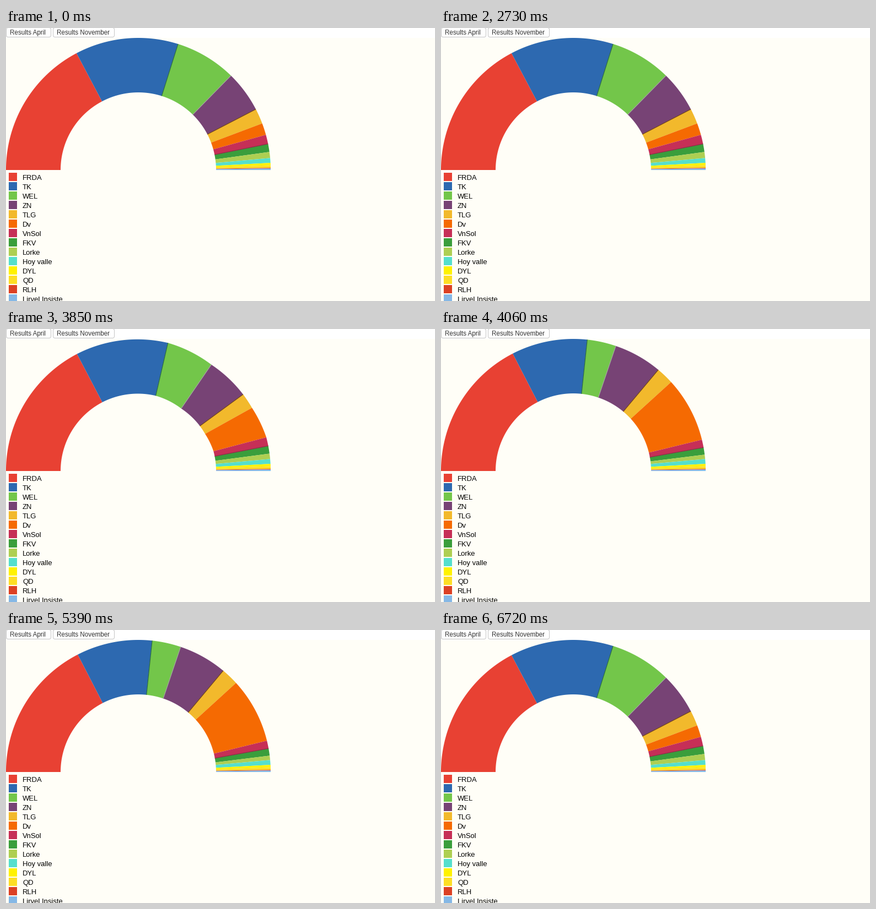
Write a matplotlib script that moves like this. It is 778x496 px and loops after 6.79 s.

```python
import numpy as np
import matplotlib.pyplot as plt
from matplotlib.animation import FuncAnimation
from matplotlib.patches import FancyBboxPatch, Polygon, Rectangle

W, H, DPI = 778, 496, 100
FRAMES, STEP = 97, 70
CENTER, R_OUT, R_IN = np.array([240, 258]), 240, 141

PARTIES = [
    ("FRDA", "#e84133"), ("TK", "#2d69b0"), ("WEL", "#73c64a"),
    ("ZN", "#774375"), ("TLG", "#f2b92c"), ("Dv", "#f56a02"),
    ("VnSol", "#c62f57"), ("FKV", "#3a9e3c"), ("Lorke", "#aecf52"),
    ("Hoy valle", "#55dfcd"), ("DYL", "#fff200"), ("QD", "#fdde25"),
    ("RLH", "#dc4124"), ("Lirvel Insiste", "#85b8e6"),
]

# Slice borders in degrees, clockwise from the left end.
SMALL = [174.8, 176.9, 177.95, 179.05, 179.35, 180]
NOVEMBER = np.array([0, 62.15, 107.45, 134.4, 152.6, 159.35, 164.55,
                     168.6, 172.15] + SMALL)
APRIL = np.array([0, 62.75, 95.95, 108.55, 129.8, 137.5, 166.3,
                  169.75, 172.9] + SMALL)

# Thin seams where neighbouring slices meet: border index -> colour.
SEAMS = {2: "#2c6b47", 3: "#a0a79a", 4: "#70431f", 7: "#8a2f45"}

TO_APRIL, TO_NOVEMBER, DURATION = 3620, 5340, 500


def cubic_in_out(u):
    u = min(max(u, 0), 1)
    return 4 * u**3 if u < 0.5 else 1 - 4 * (1 - u)**3


def april_share(t):
    return (cubic_in_out((t - TO_APRIL) / DURATION)
            - cubic_in_out((t - TO_NOVEMBER) / DURATION))


def points(radius, deg):
    a = np.radians(deg)
    return CENTER - radius * np.column_stack([np.cos(a), np.sin(a)])


def borders(radius, share):
    """Border points, which travel along straight lines, not on the circle."""
    start, end = points(radius, NOVEMBER), points(radius, APRIL)
    return start + (end - start) * share


def arc(p, q, radius):
    """Clockwise arc of a fixed radius from p to q."""
    d = q - p
    chord = np.hypot(*d)
    normal = np.array([-d[1], d[0]]) / chord
    mid = (p + q) / 2 + normal * np.sqrt(radius**2 - chord**2 / 4)
    half = np.arcsin(chord / 2 / radius)
    top = np.arctan2(-normal[1], -normal[0])
    a = np.linspace(top - half, top + half, 50)
    return mid + radius * np.column_stack([np.cos(a), np.sin(a)])


def slice_outline(i, outer, inner):
    return np.vstack([arc(outer[i], outer[i + 1], R_OUT),
                      arc(inner[i], inner[i + 1], R_IN)[::-1]])


def text(x, y, label, px, color):
    ax.text(x, y, label, fontsize=px * 72 / DPI, color=color,
            family="Liberation Sans", va="baseline", zorder=5)


def button(x, width, label):
    ax.add_patch(FancyBboxPatch(
        (x + 0.5, -0.5), width - 1, 17,
        boxstyle="round,pad=0,rounding_size=3.5",
        fc="white", ec="#c4c4c4", lw=0.72, zorder=4))
    text(x + 7.5, 12, label, 11.6, "#333333")


fig = plt.figure(figsize=(W / DPI, H / DPI), dpi=DPI, facecolor="white")
ax = fig.add_axes([0, 0, 1, 1])
ax.set_xlim(0, W)
ax.set_ylim(H, 0)
ax.axis("off")

ax.add_patch(Rectangle((0, 18), W, H - 18, fc="#fffef7", lw=0, zorder=0))
button(0, 82, "Results April")
button(85, 112, "Results November")

slices = []
for i, (name, color) in enumerate(PARTIES):
    y = 263 + 17 * i
    ax.add_patch(Rectangle((5, y), 15, 15, fc=color, lw=0, zorder=3))
    text(30, y + 13, name, 13, "black")
    slices.append(ax.add_patch(
        Polygon(np.zeros((3, 2)), fc=color, lw=0, zorder=1)))

seams = {i: ax.plot([], [], color=c, lw=0.9, solid_capstyle="butt", zorder=2)[0]
         for i, c in SEAMS.items()}


def update(frame):
    share = april_share(frame * STEP)
    outer, inner = borders(R_OUT, share), borders(R_IN, share)
    for i, patch in enumerate(slices):
        patch.set_xy(slice_outline(i, outer, inner))
    for i, line in seams.items():
        line.set_data(*zip(inner[i], outer[i]))
    return slices + list(seams.values())


anim = FuncAnimation(fig, update, frames=FRAMES, interval=STEP,
                     repeat=True, repeat_delay=0, blit=False)
plt.show()
```
